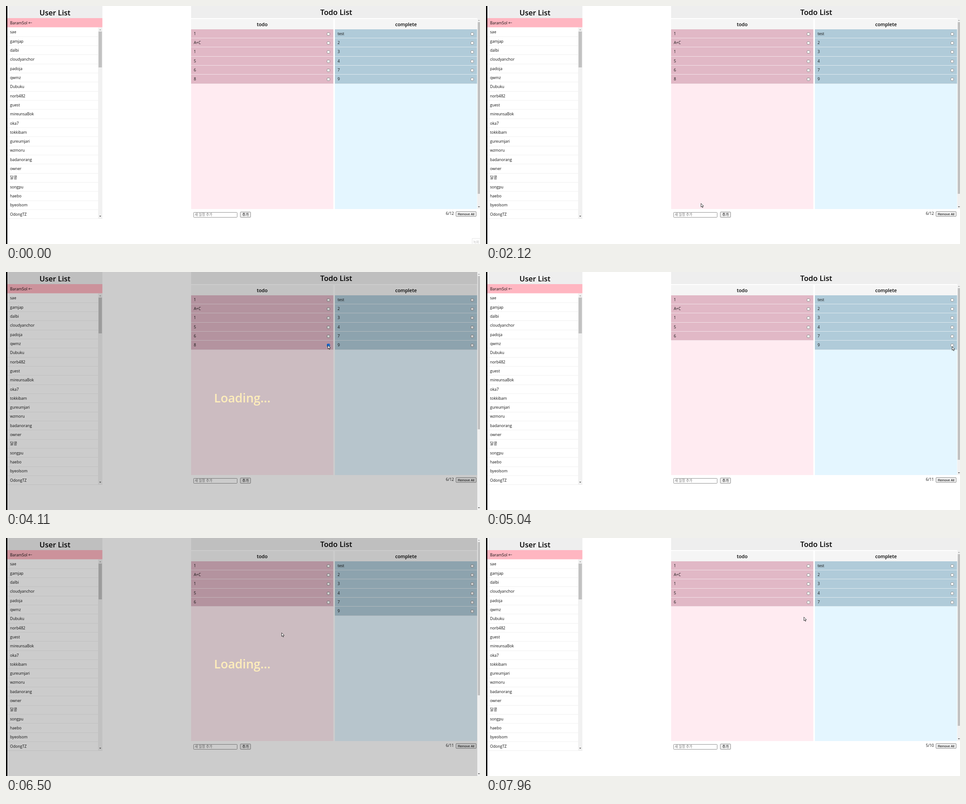
An HTML page with a canvas for the animation above (8000 ms loop, 1055 px wide and 531 px high).

```html
<!DOCTYPE html>
<html lang="ko">
<head>
<meta charset="utf-8">
<title>Todo List</title>
<style>
  html, body { margin: 0; width: 100%; height: 100%; overflow: hidden; background: #fff; }
  canvas { display: block; }
</style>
</head>
<body>
<canvas id="stage" width="1055" height="531"></canvas>
<script>
const ctx = document.getElementById('stage').getContext('2d');
const LOOP = 8000;
const STEP = 132.67; // the screen refreshes about 7.5 times a second
const ROW = 20.33;
const SANS = '"Open Sans", "Noto Sans CJK KR", "Noto Sans CJK", "Noto Sans", sans-serif';
const FORM = '"Liberation Sans", "Noto Sans CJK KR", "Noto Sans CJK", sans-serif';

const activeUser = 'BaramSol';
const users = ['sae', 'gamjap', 'dalbi', 'cloudyanchor', 'padoja', 'qwmz', 'Dubuku',
  'norb482', 'guest', 'mireunsaBok', 'oka7', 'tokkibam', 'gureumjari', 'wzmoru',
  'badanorang', 'owner', '달콩', 'songpu', 'haebo', 'byeolsom', 'OdongTZ'];

// Pointer gestures: first step, last step, where it ends
const moves = [
  [1, 5, 844, 485],
  [12, 16, 478, 440],
  [16, 18, 534, 251],
  [18, 20, 435, 158],
  [21, 27, 716, 163],
  [31, 32, 820, 217],
  [32, 37, 1037, 166],
  [40, 44, 738, 177],
  [44, 49, 613, 211],
  [50, 54, 716, 163],
  [59, 60, 707, 176]
];

const smooth = p => p * p * (3 - 2 * p);
const between = (n, a, b) => n >= a && n < b;

function pointerAt(n) {
  let x = 1050, y = 522;
  for (const [from, to, endX, endY] of moves) {
    const p = smooth(Math.min(1, Math.max(0, (n - from) / (to - from))));
    x += (endX - x) * p;
    y += (endY - y) * p;
  }
  return { x, y };
}

function stateAt(n) {
  const reload = between(n, 10, 12);
  const remove8 = between(n, 29, 32);
  const move9 = between(n, 48, 50);
  const remove9 = between(n, 57, 60);
  const todo = ['1', 'A+C', '1', '5', '6'];
  const done = ['test', '2', '3', '4', '7'];
  if (n < 32) todo.push('8');
  if (n < 50) done.push('9');
  else if (n < 60) todo.push('9');
  return {
    loading: reload || remove8 || move9 || remove9,
    todo: reload ? [] : todo,
    done: reload ? [] : done,
    hasUsers: !between(n, 10, 13),
    checked: remove8 || remove9,
    status: between(n, 8, 13),
    badge: n < 2,
    cursor: n > 0 && pointerAt(n)
  };
}

function rect(x, y, w, h, color) {
  ctx.fillStyle = color;
  ctx.fillRect(x, y, w, h);
}

function text(str, x, y, size, { color = '#111', weight = 400, family = SANS, align = 'left' } = {}) {
  ctx.font = `${weight} ${size}px ${family}`;
  ctx.fillStyle = color;
  ctx.textAlign = align;
  ctx.fillText(str, x, y);
}

const title = (str, x, y, size) =>
  text(str, x, y, size, { weight: 600, align: 'center', color: '#000' });

function box(x, y, w, h, r, fill, stroke) {
  ctx.beginPath();
  ctx.roundRect(x + .5, y + .5, w - 1, h - 1, r);
  ctx.fillStyle = fill;
  ctx.fill();
  ctx.strokeStyle = stroke;
  ctx.lineWidth = .8;
  ctx.stroke();
}

function button(label, x, y, w, h, size) {
  box(x, y, w, h, 1.5, '#efefef', '#767676');
  text(label, x + w / 2, y + h / 2 + size * .37, size, { color: '#000', family: FORM, align: 'center' });
}

function polygon(points, fill) {
  ctx.beginPath();
  points.forEach(([x, y]) => ctx.lineTo(x, y));
  ctx.closePath();
  ctx.fillStyle = fill;
  ctx.fill();
}

function arrow(x, y, dir, color) {
  polygon([[x - 2.2, y - dir], [x + 2.2, y - dir], [x, y + 1.3 * dir]], color);
}

function scrollbar(x, y, w, h, thumbY, thumbH) {
  rect(x, y, w, h, '#f1f1f1');
  if (thumbH) rect(x + 1, thumbY, w - 2, thumbH, '#c1c1c1');
  arrow(x + w / 2, y + 5, -1, '#a3a3a3');
  arrow(x + w / 2, y + h - 5, 1, thumbH ? '#505050' : '#a3a3a3');
}

function checkbox(x, y, checked) {
  if (!checked) return box(x, y, 7, 7, 1.2, '#fff', '#767676');
  box(x, y, 7, 7, 1.2, '#0075ff', '#0075ff');
  ctx.beginPath();
  ctx.moveTo(x + 1.4, y + 3.6);
  ctx.lineTo(x + 2.9, y + 5.1);
  ctx.lineTo(x + 5.6, y + 1.9);
  ctx.strokeStyle = '#fff';
  ctx.stroke();
}

function drawUsers(s) {
  rect(3, 0, 211.5, 27, '#eee');
  title('User List', 109, 20.5, 16.4);
  rect(3, 27, 211.5, 20.5, '#ffb6c1');
  text(activeUser + ' ←', 9, 41, 8.6);
  if (s.hasUsers) users.forEach((name, i) => {
    const y = 48 + i * ROW;
    text(name, 9, y + 13.2, 8.6);
    rect(3, Math.round(y + 19.6), 202, 1, '#f0f0f0');
  });
  scrollbar(205, 48, 9.5, 426, 57, s.hasUsers ? 80 : 0);
  rect(3, 474, 212, 1, '#eee');
}

function drawColumn(name, x, items, back, rowColor, lastChecked) {
  const w = 316.5;
  rect(x, 29, w, 23, '#f5f5f5');
  title(name, x + w / 2, 45, 10.7);
  rect(x, 52, w, 401, back);
  items.forEach((item, i) => {
    const y = Math.round(51.7 + i * ROW);
    const next = Math.round(51.7 + (i + 1) * ROW);
    rect(x, y, w, next - y, rowColor);
    rect(x, next - 1, w, 1, 'rgba(255,255,255,.6)');
    text(item, x + 5.9, y + 13, 8.6);
    checkbox(x + 302.2, y + 7, lastChecked && i === items.length - 1);
  });
}

function drawTodos(s) {
  rect(412, 0, 643, 27, '#eee');
  title('Todo List', 735, 20.3, 16.5);
  drawColumn('todo', 412, s.todo, '#ffebf1', '#e1b8c6', s.checked);
  drawColumn('complete', 732, s.done, '#e4f6ff', '#b0cbd9', false);
  scrollbar(1049, 27, 7, 426, 36, 383);

  box(417, 460, 98, 12, 1, '#fff', '#767676');
  text('새 일정 추가', 420, 468.4, 7.6, { color: '#757575', family: FORM });
  button('추가', 521, 459, 24, 13, 7.8);
  const total = s.todo.length + s.done.length;
  text(`${s.done.length}/${total}`, 997, 466.2, 8.6, { align: 'right' });
  button('Remove All', 1001, 458, 46, 12, 7.2);
}

function drawLoading() {
  rect(3, 0, 1046, 531, 'rgba(0,0,0,.2)');
  text('Loading...', 463, 291, 27, { weight: 600, color: '#ffeebb' });
  scrollbar(1049, 0, 7, 531, 9, 342);
}

function drawStatus() {
  ctx.beginPath();
  ctx.roundRect(3, 520.5, 350.5, 12, [0, 2, 0, 0]);
  ctx.fillStyle = '#000';
  ctx.fill();
  text('todo-api.roto.codes의 응답을 기다리는 중...', 5, 528.5, 6.8, { color: '#fff' });
}

function drawBadge() {
  box(1037, 518, 22, 16, 0, '#fdfdfd', '#e2e2e2');
  text('녹화', 1040, 528.5, 7, { color: '#c4c4c4' });
}

function drawCursor({ x, y }) {
  ctx.save();
  ctx.translate(Math.round(x) + .5, Math.round(y) + .5);
  polygon([[0, 0], [0, 8], [1.9, 6.3], [3.2, 9.3], [4.5, 8.8], [3.2, 5.9], [5.8, 5.8]], '#fff');
  ctx.strokeStyle = '#111';
  ctx.lineWidth = .8;
  ctx.stroke();
  ctx.restore();
}

function draw(t) {
  const s = stateAt(Math.floor((t + 8) / STEP));
  rect(0, 0, 1055, 531, '#fff');
  drawUsers(s);
  drawTodos(s);
  if (s.loading) drawLoading();
  rect(0, 0, 3, 531, '#000');
  if (s.status) drawStatus();
  if (s.badge) drawBadge();
  if (s.cursor) drawCursor(s.cursor);
}

const start = performance.now();
function frame() {
  draw((performance.now() - start) % LOOP);
  requestAnimationFrame(frame);
}
frame();
</script>
</body>
</html>
```
